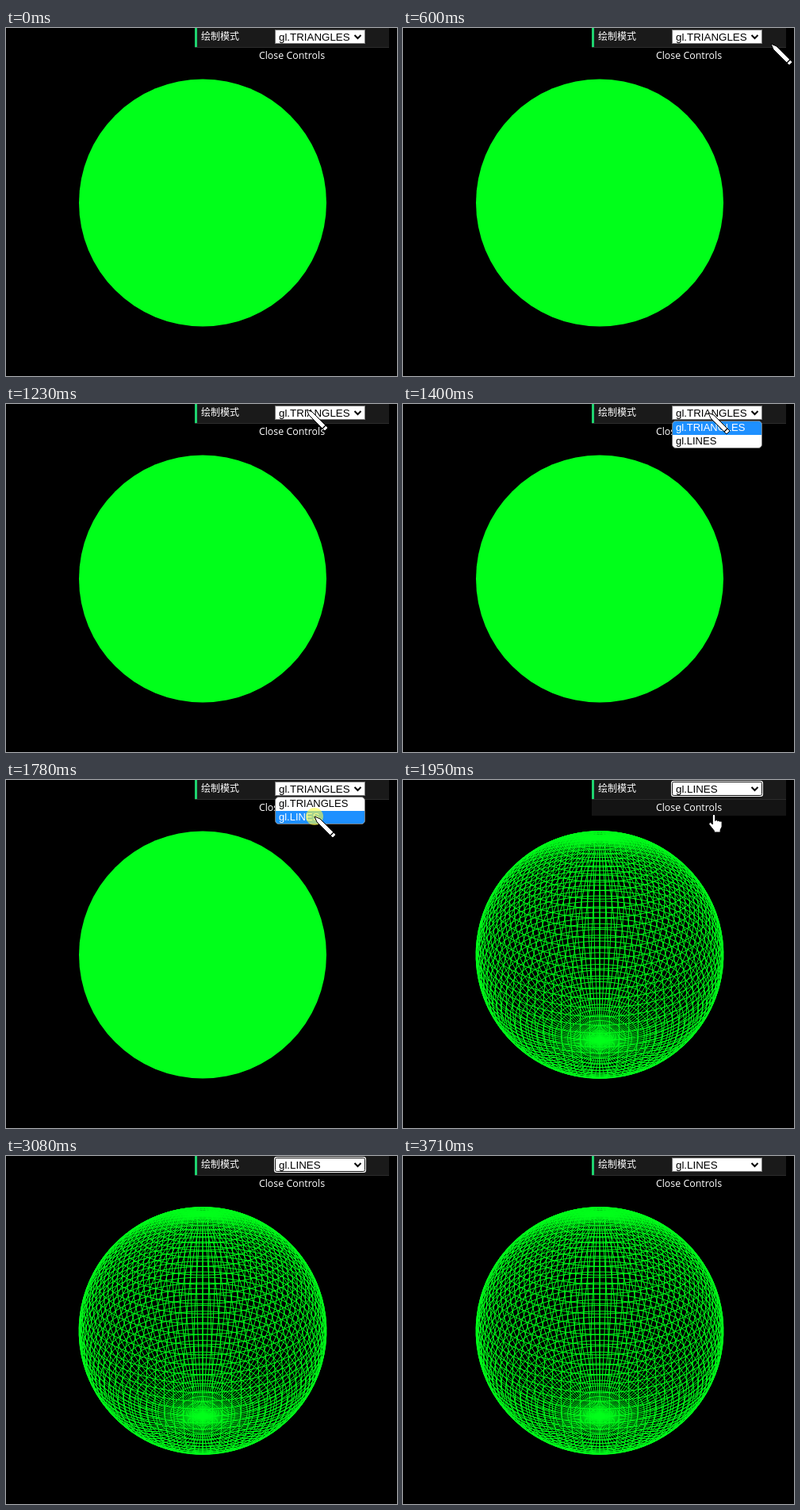
Animation of 493x439 px, one loop 3800 ms. Source, as an HTML page with a canvas:

```html
<!DOCTYPE html>
<html lang="zh">
<head>
<meta charset="utf-8">
<title>Sphere draw mode</title>
<style>
  html, body { margin: 0; width: 100%; height: 100%; overflow: hidden; background: #000; }
  canvas, svg { position: absolute; left: 0; top: 0; display: block; }
  .label { font: 12px "Noto Sans CJK SC", "Noto Sans CJK", sans-serif; fill: #fff; }
  .close { font: 12.4px "Open Sans", "Noto Sans", sans-serif; fill: #fff; }
  .value { font: 13.333px "Liberation Sans", Arial, sans-serif; }
  .item { font: 13px "Liberation Sans", Arial, sans-serif; }
</style>
</head>
<body>
<canvas id="wire" width="493" height="439"></canvas>
<svg width="493" height="439" viewBox="0 0 493 439">
  <circle id="disk" cx="248" cy="220.5" r="156" fill="#00ff1a"/>

  <rect x="238" y="0" width="245" height="24" fill="#1a1a1a"/>
  <rect x="238" y="24" width="245" height="1" fill="#2c2c2c"/>
  <rect x="238" y="0" width="3" height="24" fill="#1ed36f"/>
  <text class="label" x="246" y="15">绘制模式</text>

  <rect id="hover" x="238" y="25" width="245" height="20" fill="#141414"/>
  <text class="close" x="360.5" y="39" text-anchor="middle">Close Controls</text>

  <rect id="ring" x="338" y="1" width="116" height="20" rx="3" fill="#fff"/>
  <rect id="box" x="339.5" y="2.5" width="113" height="17" fill="#fff" stroke="#767676"/>
  <text id="value" class="value" x="344" y="16"></text>
  <path d="M439.5 9l4 4 4-4" fill="none" stroke="#000" stroke-width="2"/>

  <g id="list">
    <rect x="339.5" y="21.5" width="113" height="34" rx="4.5" fill="#fff" stroke="#767676"/>
    <path id="row0" d="M340 39V26a4 4 0 0 1 4-4h104a4 4 0 0 1 4 4v13z" fill="#1e90ff"/>
    <path id="row1" d="M340 39v12a4 4 0 0 0 4 4h104a4 4 0 0 0 4-4V39z" fill="#1e90ff"/>
    <text id="item0" class="item" x="344" y="34">gl.TRIANGLES</text>
    <text id="item1" class="item" x="344" y="51">gl.LINES</text>
  </g>

  <g id="cursor">
    <circle id="click" r="11" fill="#ffff40" opacity=".6"/>
    <g id="pencil" stroke="#000">
      <path d="M0 0L7 3L27 23L23 27L3 7Z" fill="#fff" stroke-linejoin="round"/>
      <path d="M24 20L20 24" stroke-width="1.5"/>
    </g>
    <path id="hand" transform="translate(-6.7 0)" fill="#fff" stroke="#000"
      d="M5 13V2a1.7 1.7 0 0 1 3.4 0V8.5a1.6 1.6 0 0 1 3 .3 1.6 1.6 0 0 1 2.8 .6 1.5 1.5 0 0 1 2.6 1V16l-2 4V23H7V21L1 13.5a1.7 1.7 0 0 1 2.4-2.4z"/>
  </g>
</svg>
<script>
const LOOP = 3800;
const $ = id => document.getElementById(id);
const show = (id, on) => $(id).setAttribute('visibility', on ? 'inherit' : 'hidden');
const between = (t, a, b) => t >= a && t < b;

// Unit sphere seen from (0, 2, 3) looking at the origin
const DIST = Math.sqrt(13), FOCAL = 540, RINGS = 50, MERIDIANS = 100;

function project(lat, lon) {
  const x = Math.sin(lat) * Math.sin(lon);
  const y = Math.cos(lat);
  const z = Math.sin(lat) * Math.cos(lon);
  const scale = FOCAL / (DIST - (2 * y + 3 * z) / DIST);
  return [248 + x * scale, 220.5 - (3 * y - 2 * z) / DIST * scale];
}

function drawWire() {
  const g = $('wire').getContext('2d');
  g.strokeStyle = '#00ff1a';
  const line = (count, point) => {
    g.beginPath();
    for (let i = 0; i <= count; i++) g.lineTo(...point(i));
    g.stroke();
  };
  const lat = i => i * Math.PI / RINGS;
  const lon = i => i * 2 * Math.PI / MERIDIANS;
  for (let m = 0; m < MERIDIANS; m++) line(RINGS, i => project(lat(i), lon(m)));
  for (let r = 1; r < RINGS; r++) line(MERIDIANS, i => project(lat(r), lon(i)));
}

const easeOut = p => 1 - (1 - p) ** 2;
const easeIn = p => p * p;
const smooth = p => p * p * (3 - 2 * p);

// start, end, step length, from, to, easing
const MOVES = [
  [570, 850, 40, [464, 20], [379, 7], easeOut],
  [1230, 1310, 40, [379, 7], [385, 11], smooth],
  [1440, 1620, 45, [385, 11], [389, 46], smooth],
  [1950, 1951, 1, [392, 43], [392, 43], smooth],
  [2593, 3037, 37, [392, 43], [464, 399], easeIn],
];

function tipAt(t) {
  const move = MOVES.filter(m => m[0] <= t).pop() || MOVES[0];
  const [start, end, step, from, to, ease] = move;
  const passed = Math.max(0, Math.floor((t - start) / step) * step);
  const p = ease(Math.min(1, passed / (end - start)));
  return from.map((v, i) => v + (to[i] - v) * p);
}

function render(t) {
  const lines = t >= 1910;
  const [x, y] = tipAt(t);
  const visible = between(t, 570, 3080);
  const hand = visible && t >= 1950 && y < 45;
  const focus = between(t, 1910, 3710);
  const picked = y > 38 ? 1 : 0;

  $('wire').style.visibility = lines ? 'visible' : 'hidden';
  show('disk', !lines);
  $('value').textContent = lines ? 'gl.LINES' : 'gl.TRIANGLES';
  show('ring', focus);
  $('box').setAttribute('stroke', focus ? '#101010' : '#767676');
  $('box').setAttribute('rx', focus ? 2 : 0);
  show('hover', hand);

  show('list', between(t, 1350, 1910));
  for (const i of [0, 1]) {
    show('row' + i, picked === i);
    $('item' + i).setAttribute('fill', picked === i ? '#fff' : '#000');
  }

  show('cursor', visible);
  $('cursor').setAttribute('transform', `translate(${Math.round(x)} ${Math.round(y)})`);
  show('pencil', !hand);
  show('hand', hand);
  show('click', between(t, 1270, 1360) || between(t, 1780, 1910));
}

drawWire();
render(0);
const begin = performance.now();
(function tick() {
  render((performance.now() - begin) % LOOP);
  requestAnimationFrame(tick);
})();
</script>
</body>
</html>
```
